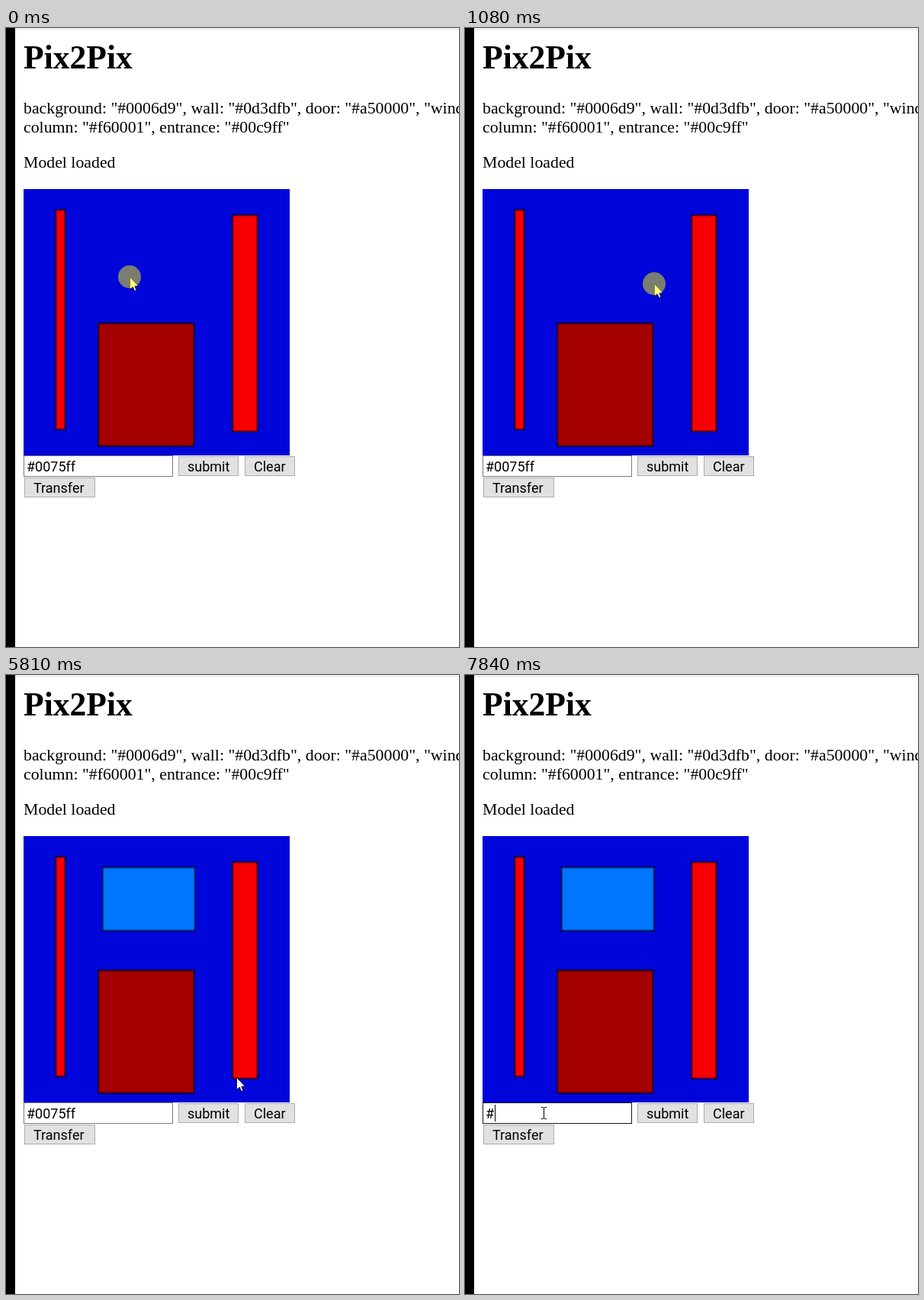
An HTML page with a canvas for the animation above (8 s loop, 594 by 811 pixels).

```html
<!DOCTYPE html>
<html lang="en">
<head>
<meta charset="utf-8">
<title>Pix2Pix</title>
<style>
  html, body { margin: 0; width: 100%; height: 100%; overflow: hidden; background: #fff; }
  canvas { display: block; }
</style>
</head>
<body>
<canvas id="stage" width="594" height="811"></canvas>
<script>
const ctx = document.getElementById('stage').getContext('2d');
const LOOP = 8000;
const SERIF = '"Liberation Serif", serif';
const CONTROL_FONT = '18px Roboto, sans-serif';

// Pointer keys: [time, kind, x, y, pressed]
const pointerKeys = [
  [0, 'arrow', 162, 326, true],
  [70, 'arrow', 166, 326, true],
  [300, 'arrow', 177, 327, true],
  [380, 'arrow', 191, 328, true],
  [460, 'arrow', 205, 329, true],
  [530, 'arrow', 217, 332, true],
  [610, 'arrow', 227, 334, true],
  [930, 'arrow', 233, 334, true],
  [1010, 'arrow', 241, 335, true],
  [1080, 'arrow', 248, 335, true],
  [1400, 'arrow', 248, 335, false],
  [2790, 'arrow', 370, 294, false],
  [2870, 'arrow', 538, 230, false],
  [2950, 'none', 0, 0, false],
  [5810, 'arrow', 302, 527, false],
  [5890, 'beam', 106, 574, false],
  [6120, 'beam', 103, 574, false],
  [6520, 'beam', 103, 574, true],
  [6670, 'beam', 103, 574, false]
];
const WINDOW_AT = 1400, HOVER_AT = 5890, PRESS_AT = 6520, RELEASE_AT = 6670;
const deletions = [6990, 7140, 7310, 7460, 7610, 7840];

function fill(color, x, y, w, h) {
  ctx.fillStyle = color;
  ctx.fillRect(x, y, w, h);
}

function text(str, x, y, font) {
  ctx.font = font;
  ctx.fillStyle = '#000';
  ctx.fillText(str, x, y);
}

function box(x, y, w, h, face, border) {
  fill(face, x, y, w, h);
  ctx.strokeStyle = border;
  ctx.lineWidth = 1;
  ctx.strokeRect(x + 0.5, y + 0.5, w - 1, h - 1);
}

function button(label, x, y, w) {
  box(x, y, w, 26, '#e1e1e1', '#adadad');
  text(label, x + 12, y + 20, CONTROL_FONT);
}

// The label picture is painted at 256 pixels and shown enlarged, which softens its lines.
function paintPicture(withWindow) {
  const canvas = document.createElement('canvas');
  canvas.width = canvas.height = 256;
  const pen = canvas.getContext('2d');
  const block = (color, left, top, right, bottom) => {
    const rect = [left, top, right - left, bottom - top];
    pen.fillStyle = color;
    pen.fillRect(...rect);
    pen.strokeRect(...rect);
  };
  pen.fillStyle = '#0006d9';
  pen.fillRect(0, 0, 256, 256);
  pen.strokeStyle = '#000';
  block('#f60001', 31, 20, 40, 231);
  block('#f60001', 201, 25, 225, 233);
  block('#a50000', 72, 129, 164, 247);
  if (withWindow) {
    block('#0075ff', 76, 30, 165, 91);
  } else {
    pen.fillStyle = 'rgba(0,0,0,.3)';
    pen.fillRect(87, 39, 1, 1);
  }
  return canvas;
}

const emptyWall = paintPicture(false);
const wallWithWindow = paintPicture(true);

function drawPage() {
  fill('#fff', 0, 0, 594, 811);
  fill('#dcdcdc', 12, 1, 582, 1);
  fill('#000', 0, 0, 12, 811);
  const body = `21.8px ${SERIF}`;
  text('Pix2Pix', 23, 53, `bold 43.6px ${SERIF}`);
  text('background: "#0006d9", wall: "#0d3dfb", door: "#a50000", "window', 23, 112, body);
  text('column: "#f60001", entrance: "#00c9ff"', 23, 137, body);
  text('Model loaded', 23, 183, body);
  button('submit', 226, 561, 79);
  button('Clear', 313, 561, 66);
  button('Transfer', 24, 589, 93);
}

function drawInput(t) {
  let border = '#7a7a7a';
  if (t >= HOVER_AT) border = '#171717';
  if (t >= PRESS_AT && t < RELEASE_AT) border = '#0078d7';
  box(23, 560, 196, 28, '#fff', border);
  const removed = deletions.filter(at => t >= at).length;
  const value = '#0075ff'.slice(0, 7 - removed);
  text(value, 27, 581, CONTROL_FONT);
  if (t >= PRESS_AT) {
    fill('#000', Math.round(27.5 + ctx.measureText(value).width), 563, 1, 22);
  }
}

function drawArrow(x, y) {
  const path = new Path2D('M.5 .5V16.5L4.2 13L6.6 18.5L9 17.5L6.7 12.1H11.5Z');
  ctx.save();
  ctx.translate(x, y);
  ctx.fillStyle = '#fff';
  ctx.fill(path);
  ctx.strokeStyle = '#000';
  ctx.lineWidth = 0.8;
  ctx.stroke(path);
  ctx.restore();
}

function drawBeam(x, y) {
  fill('#000', x, y - 7, 1, 14);
  for (const edge of [y - 8, y + 7]) {
    fill('#000', x - 3, edge, 3, 1);
    fill('#000', x + 1, edge, 3, 1);
  }
}

function drawPointer(t) {
  const [, kind, x, y, pressed] = pointerKeys.filter(key => t >= key[0]).pop();
  if (kind === 'arrow') drawArrow(x, y);
  if (kind === 'beam') drawBeam(x, y);
  if (pressed) {
    ctx.fillStyle = 'rgba(255,255,0,.48)';
    ctx.beginPath();
    ctx.arc(x, kind === 'beam' ? y - 1 : y, 15, 0, Math.PI * 2);
    ctx.fill();
  }
}

const start = performance.now();
function frame() {
  const t = (performance.now() - start) % LOOP;
  drawPage();
  ctx.drawImage(t < WINDOW_AT ? emptyWall : wallWithWindow, 23, 211, 349, 349);
  drawInput(t);
  drawPointer(t);
  requestAnimationFrame(frame);
}
frame();
</script>
</body>
</html>
```
